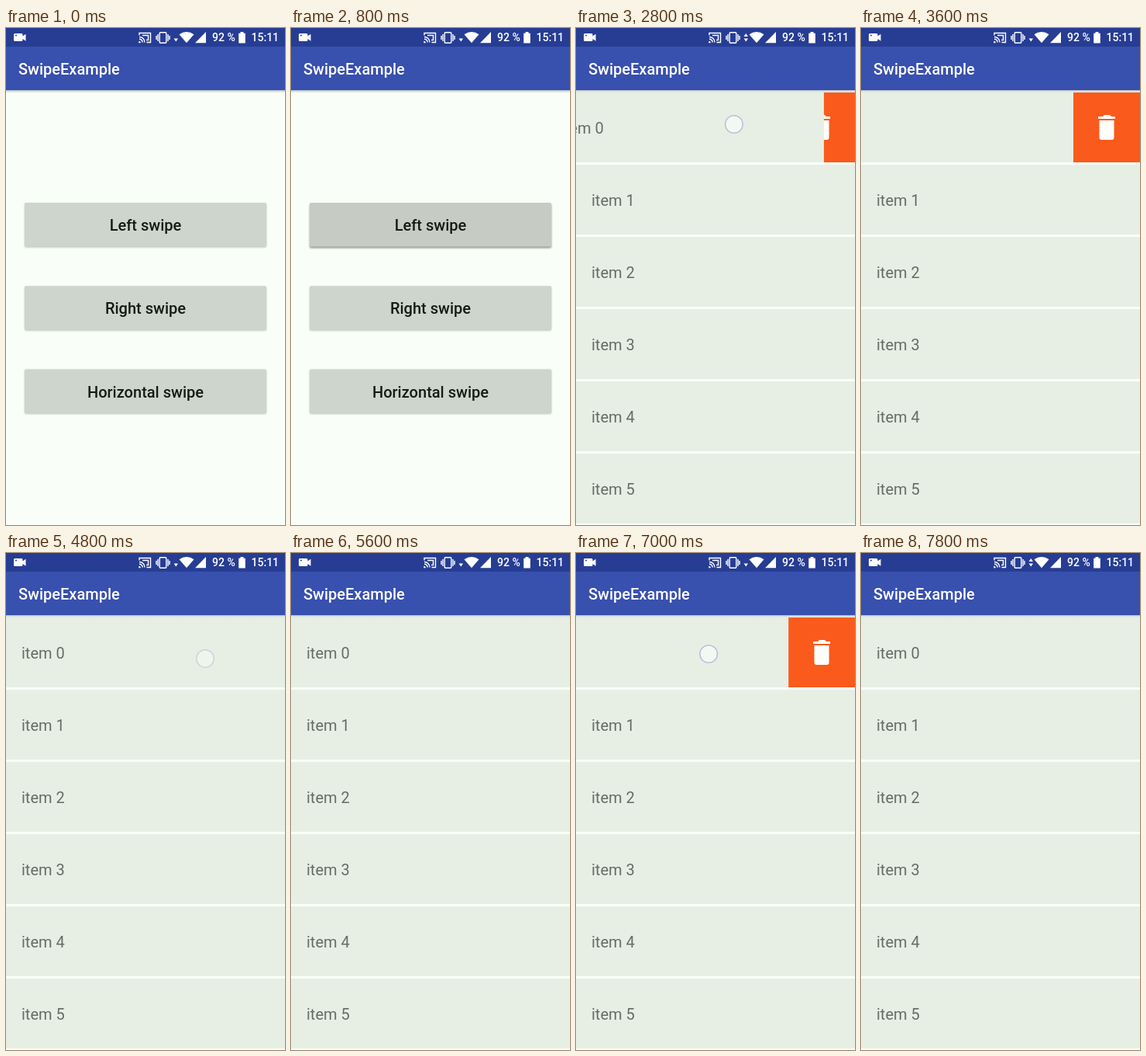
An HTML page that plays this animation: 360x640 px, repeating every 8 s.

```html
<!DOCTYPE html>
<html lang="en">
<head>
<meta charset="utf-8">
<title>Swipe demo</title>
<style>
  html, body { margin: 0; width: 100%; height: 100%; overflow: hidden; background: #f9fff8; }
  svg { display: block; width: 360px; height: 640px; font-family: Roboto, sans-serif; }
  .title { font-size: 20px; font-weight: 500; fill: #fff; }
  .label { font-size: 20px; font-weight: 500; fill: #151a15; text-anchor: middle; }
  .item { font-size: 20px; fill: #666c66; }
  .status { font-size: 14px; font-weight: 500; fill: #fff; }
</style>
</head>
<body>
<svg viewBox="0 0 360 640">
  <defs>
    <linearGradient id="shade" x2="0" y2="1">
      <stop offset="0" stop-color="#6a7a90" stop-opacity=".5"/>
      <stop offset="1" stop-color="#a0b0a0" stop-opacity="0"/>
    </linearGradient>
    <filter id="blur" x="-5%" y="-20%" width="110%" height="140%"><feGaussianBlur stdDeviation="1.3"/></filter>
    <clipPath id="rowClip"><rect y="83" width="360" height="90"/></clipPath>
    <g id="bar">
      <rect y="80" width="360" height="4" fill="url(#shade)"/>
      <rect y="24" width="360" height="56" fill="#3850ae"/>
      <text class="title" x="16" y="60">SwipeExample</text>
    </g>
  </defs>

  <rect width="360" height="640" fill="#f9fff8"/>
  <g id="menu"></g>
  <use href="#bar"/>

  <g id="list">
    <rect y="24" width="360" height="616" fill="#fafef9"/>
    <g id="rows"></g>
    <g clip-path="url(#rowClip)">
      <rect x="274" y="83" width="86" height="90" fill="#fa5a1c"/>
      <path fill="#fff" d="M306 114h6l2-2h7l2 2h5v3h-22zM307.500 119h19v22q0 3-3 3h-13q-3 0-3-3z"/>
      <g id="front">
        <rect y="83" width="360" height="90" fill="#e7efe4"/>
        <circle id="ripple" cy="129" fill="#dfe7de"/>
        <text class="item" x="20" y="136">item 0</text>
      </g>
    </g>
    <use href="#bar"/>
  </g>

  <circle id="dot" r="11.300" fill="#fbfffb" fill-opacity=".6" stroke="#b9c1dc" stroke-width="1.500"/>

  <rect width="360" height="24" fill="#273d94"/>
  <g fill="#fff">
    <path d="M11.500 7h8.500q1.500 0 1.500 1.500v2l4-2.800v9l-4-2.800v1.600q0 1.500-1.500 1.500h-8.500q-1.500 0-1.500-1.500v-7q0-1.500 1.500-1.500z"/>
    <circle cx="13" cy="9.500" r="1" fill="#273d94"/>
    <g fill="none" stroke="#fff" stroke-width="1.400">
      <path d="M172 9.500v-3h14.500v12h-5M172 11.500a7 7 0 0 1 7 7M172 14.300a4.200 4.200 0 0 1 4.200 4.200"/>
      <path d="M176 9.500h7.500v6h-2.500"/>
      <rect x="198.200" y="5.700" width="8.600" height="13.600" rx="1"/>
      <path d="M196 8v9M194 10v5M209 8v9M211 10v5"/>
    </g>
    <path d="M171.300 16.700a2.500 2.500 0 0 1 2.500 2.500h-2.500z"/>
    <path d="M216.500 13.500h5.500l-2.750 4z"/>
    <path id="up" d="M216.500 11h5.500l-2.750-4z"/>
    <path d="M223.500 8.300q9.500-6.600 19 0l-9.500 11z"/>
    <path d="M258 5v14.300h-14z"/>
    <path d="M302.500 5h4v1.700h2.300v12.800h-8.600v-12.800h2.300z"/>
  </g>
  <text class="status" x="266" y="17.300">92 %</text>
  <text class="status" x="316.500" y="17.300">15:11</text>
</svg>
<script>
const LOOP = 8000;
const $ = id => document.getElementById(id);
const set = (el, attrs) => { for (const k in attrs) el.setAttribute(k, attrs[k]); };

$('menu').innerHTML = ['Left', 'Right', 'Horizontal'].map((name, i) => {
  const y = 225 + i * 107.3;
  const box = `x="24" y="${y}" width="312" height="56.500" rx="2"`;
  return `<rect ${box} class="shadow" transform="translate(0 1)" fill="#7d857d" opacity=".5" filter="url(#blur)"/>
    <rect ${box} class="face" fill="#ced5cc"/>
    <text class="label" x="180" y="${y + 36}">${name} swipe</text>`;
}).join('');

$('rows').innerHTML = [1, 2, 3, 4, 5].map(i =>
  `<rect y="${83 + i * 93}" width="360" height="90" fill="#e7efe4"/>
   <text class="item" x="20" y="${136 + i * 93}">item ${i}</text>`).join('');

// Tracks: rows of [time, value, ...]
const offset = [[2450, 0], [2800, -40], [3200, -86], [4250, -86], [4760, 0],
  [5900, 0], [6200, -51], [6500, -86], [7000, -86], [7500, 0]];
const touches = [
  [[420, 190, 255], [640, 190, 255]],
  [[2300, 244, 122], [2450, 244, 122], [2800, 204, 124], [3250, 154, 126]],
  [[4170, 171, 134], [4250, 171, 134], [4760, 257, 136]],
  [[5700, 278, 130], [5900, 278, 130], [6200, 227, 129], [6520, 184, 128]],
  [[6900, 171, 130], [7000, 171, 130], [7500, 257, 131]]
];

const clamp = v => Math.max(0, Math.min(1, v));
const ramp = (t, a, b) => clamp((t - a) / (b - a));
const lerp = (a, b, p) => a + (b - a) * p;

function sample(track, t, col = 1) {
  const i = track.findIndex(k => k[0] > t);
  if (i === 0) return track[0][col];
  if (i < 0) return track[track.length - 1][col];
  const a = track[i - 1], b = track[i];
  return lerp(a[col], b[col], ramp(t, a[0], b[0]));
}

const face = document.querySelector('.face');
const shadow = document.querySelector('.shadow');

function draw(t) {
  const press = ramp(t, 500, 740);
  face.setAttribute('fill', `rgb(${lerp(206, 198, press)},${lerp(213, 204, press)},${lerp(204, 196, press)})`);
  set(shadow, { opacity: lerp(.5, .8, press), transform: `translate(0 ${lerp(1, 2, press)})` });

  const enter = 1 - (1 - ramp(t, 880, 1200)) ** 2;
  set($('list'), { opacity: enter, transform: `translate(0 ${50 * (1 - enter)})` });

  set($('front'), { transform: `translate(${sample(offset, t)} 0)` });
  const grow = ramp(t, 5830, 6435);
  set($('ripple'), { cx: 278 - 84 * grow, r: 186 * grow, opacity: 1 - ramp(t, 6450, 6650) });

  const touch = touches.find(k => t >= k[0][0] && t < k[k.length - 1][0] + 100);
  if (touch) {
    const end = touch[touch.length - 1][0];
    set($('dot'), { cx: sample(touch, t), cy: sample(touch, t, 2), opacity: 1 - ramp(t, end, end + 100) });
  }
  $('dot').style.display = touch ? '' : 'none';
  $('up').style.display = (t >= 2600 && t < 3200) || t >= 7600 ? '' : 'none';
}

const start = performance.now();
function tick() {
  draw((performance.now() - start) % LOOP);
  requestAnimationFrame(tick);
}
tick();
</script>
</body>
</html>
```
